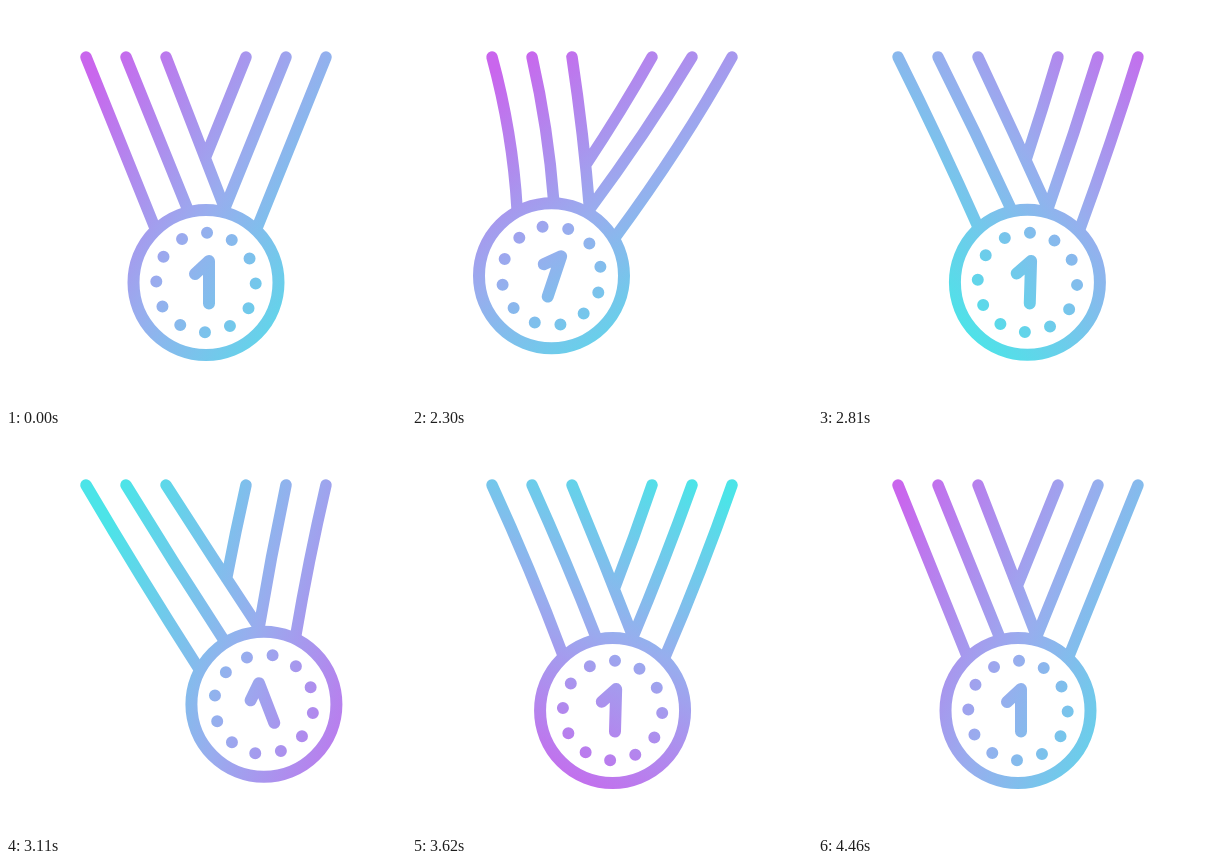
An HTML page with a canvas for the animation above (4.52 s loop, 400 px wide and 400 px high).

```html
<!DOCTYPE html>
<html lang="en">
<head>
<meta charset="utf-8">
<title>Medal</title>
<style>
  html, body { margin: 0; width: 100%; height: 100%; overflow: hidden; background: #fff; }
  canvas { display: block; width: 400px; height: 400px; }
</style>
</head>
<body>
<canvas id="stage"></canvas>
<script>
const LOOP = 4520, START = 2000, STEP = 30, LAST = 82;
const canvas = document.getElementById('stage');
const ctx = canvas.getContext('2d');
const dpr = window.devicePixelRatio || 1;
canvas.width = canvas.height = 400 * dpr;

const rad = deg => deg * Math.PI / 180;
const sine = u => (1 - Math.cos(Math.PI * u)) / 2;

// Same curve as CSS cubic-bezier().
function bezier(x1, y1, x2, y2) {
  const at = (a, b, s) => 3 * s * (1 - s) ** 2 * a + 3 * s * s * (1 - s) * b + s ** 3;
  return u => {
    let lo = 0, hi = 1;
    for (let i = 0; i < 24; i++) {
      const mid = (lo + hi) / 2;
      if (at(x1, x2, mid) < u) lo = mid; else hi = mid;
    }
    return at(y1, y2, lo);
  };
}

const launch = bezier(0.3, 0.48, 0.28, 1);
const sweep = bezier(0.3, 0.05, 0.6, 0.92);

// Turning points of the swing: [step, offset].
const turns = [[0, 0], [19, -69], [34, 73], [46, -30], [60, 20], [LAST, 0]];

function swing(k) {
  if (k <= 0) return 0;
  const i = turns.findIndex(([step]) => k <= step);
  const [t0, x0] = turns[i - 1], [t1, x1] = turns[i];
  const ease = i === 1 ? launch : sine;
  return x0 + (x1 - x0) * ease((k - t0) / (t1 - t0));
}

function tint(angle) {
  const dx = Math.cos(angle), dy = Math.sin(angle);
  const g = ctx.createLinearGradient(230 - 190 * dx, 195 - 190 * dy, 230 + 155 * dx, 195 + 155 * dy);
  g.addColorStop(0, '#c966ed');
  g.addColorStop(0.5, '#98adee');
  g.addColorStop(1, '#4ce4e8');
  return g;
}

// Adds a ribbon hanging from x = top and returns its point function.
function ribbon(top, end, bulge) {
  const bend = bulge * Math.abs(top - 200) / 120;
  const from = [top, 51];
  const mid = [(top + end[0]) / 2 + 2 * bend, (51 + end[1]) / 2];
  ctx.moveTo(...from);
  ctx.quadraticCurveTo(...mid, ...end);
  return u => from.map((p, i) =>
    (1 - u) ** 2 * p + 2 * u * (1 - u) * mid[i] + u * u * end[i]);
}

function draw(k) {
  const x = swing(k), u = k / LAST;
  const cx = 200 + x, cy = 276.5 - x * x / 540;
  const roll = rad(-0.32 * swing(k - 1));
  const bulge = 2 * Math.sin(Math.PI * u) - 0.055 * x;

  // Point at a distance from the medal's centre, clockwise from the top.
  const polar = (r, a) => [cx + r * Math.sin(a), cy - r * Math.cos(a)];
  const rim = deg => polar(75, rad(deg) + 0.85 * roll);

  ctx.setTransform(dpr, 0, 0, dpr, 0, 0);
  ctx.fillStyle = '#fff';
  ctx.fillRect(0, 0, 400, 400);
  ctx.strokeStyle = ctx.fillStyle = tint(rad(34 + 350 * sweep(u)));
  ctx.lineCap = ctx.lineJoin = 'round';

  ctx.lineWidth = 11.5;
  ctx.beginPath();
  let front;
  for (let i = 0; i < 3; i++) {
    const top = 80 + 40 * i, deg = 29 * i - 43;
    front = ribbon(top, rim(deg), bulge);
    if (i < 2) ribbon(400 - top, rim(-deg), bulge);
  }
  ribbon(240, front(0.66 + 0.01 * bulge), bulge);
  ctx.stroke();

  ctx.lineWidth = 12;
  ctx.beginPath();
  ctx.arc(cx, cy, 72.5, 0, 2 * Math.PI);
  ctx.stroke();

  ctx.beginPath();
  for (let i = 0; i < 12; i++) {
    const [px, py] = polar(49.7, roll + rad(1.2 + 30 * i));
    ctx.moveTo(px + 6, py);
    ctx.arc(px, py, 6, 0, 2 * Math.PI);
  }
  ctx.fill();

  ctx.translate(cx, cy);
  ctx.rotate(roll);
  ctx.beginPath();
  ctx.moveTo(-11, -8.5);
  ctx.lineTo(3, -21.5);
  ctx.lineTo(3, 21);
  ctx.setTransform(dpr, 0, 0, dpr, 0, 0);
  ctx.stroke();
}

const origin = performance.now();

function tick() {
  const t = (performance.now() - origin) % LOOP;
  draw(Math.min(LAST, Math.max(0, Math.floor((t - START) / STEP))));
  requestAnimationFrame(tick);
}

tick();
</script>
</body>
</html>
```
